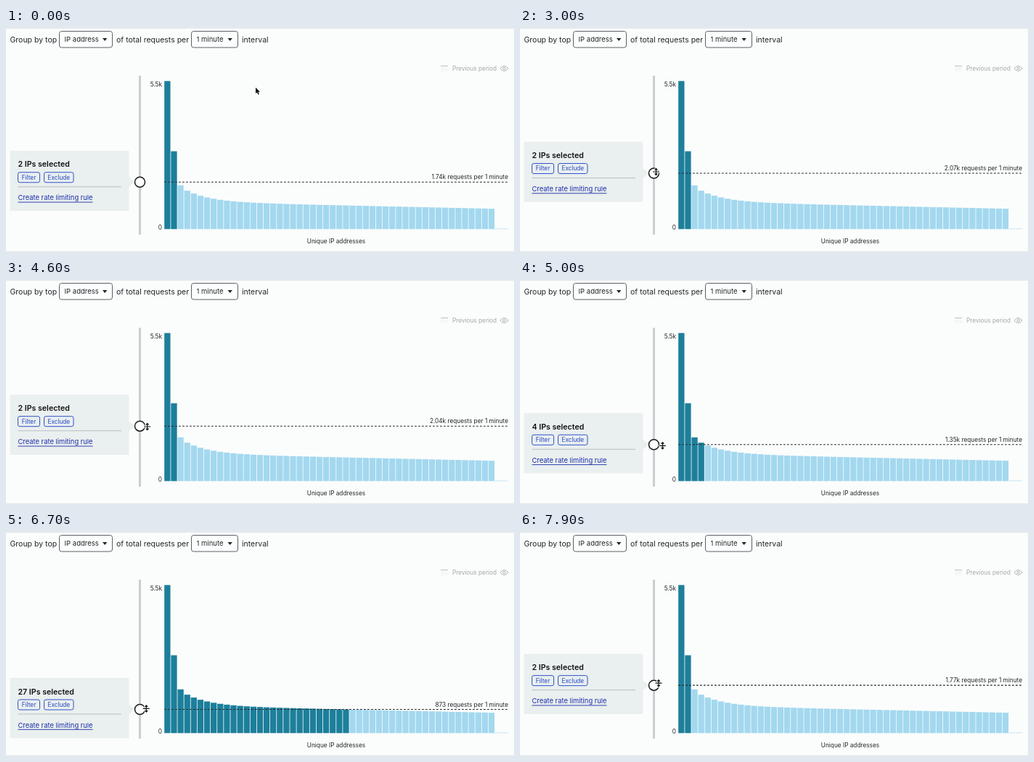
An HTML page for the animation above (8 s loop, 700 px wide and 310 px high).

```html
<!DOCTYPE html>
<html lang="en">
<head>
<meta charset="utf-8">
<title>Rate limit threshold</title>
<style>
html, body { margin: 0; width: 100%; height: 100%; overflow: hidden; background: #fbfdfc; }
svg { display: block; width: 700px; height: 310px; }
text { font: 8.25px Inter, "Liberation Sans", sans-serif; fill: #222528; }
.head { font-size: 10.5px; }
.pick { font-size: 9.5px; }
.title { font-size: 10.6px; font-weight: 600; fill: #111; }
.link { font-size: 9.4px; fill: #1b2fa8; }
.btn { fill: #2447c4; }
.muted { fill: #a3a6a9; }
.end { text-anchor: end; }
.mid { text-anchor: middle; }
.box { fill: #fdfefe; stroke: #596069; }
.button { fill: none; stroke: #2f52c9; }
.cursor { fill: #111; stroke: #fff; stroke-width: 1.6; paint-order: stroke; stroke-linejoin: round; }
</style>
</head>
<body>
<svg viewBox="0 0 700 310">
  <path d="M0 .5H700M0 309.5H700" stroke="#e6e9e9"/>
  <text class="head" x="5.5" y="19.5">Group by top</text>
  <rect class="box" x="73.5" y="4.5" width="73" height="22.5" rx="3"/>
  <text class="pick" x="80.5" y="19.2">IP address</text>
  <path d="M133 14h6.400l-3.200 4z" fill="#222528"/>
  <text class="head" x="152" y="19.5">of total requests per</text>
  <rect class="box" x="255.5" y="4.5" width="64" height="22.5" rx="3"/>
  <text class="pick" x="262.5" y="19.2">1 minute</text>
  <path d="M305.500 14h6.400l-3.200 4z" fill="#222528"/>
  <text class="head" x="325" y="19.5">interval</text>

  <rect x="599" y="52" width="10" height="8" fill="#f5f7f7"/>
  <path d="M599 52.5h10" stroke="#bfc2c4"/>
  <text class="muted" x="615" y="59">Previous period</text>
  <g fill="none" stroke="#a3a6a9" stroke-width=".9">
    <path d="M681 56q5.500-7 11 0q-5.500 7-11 0z"/>
    <circle cx="686.500" cy="56" r="1.600"/>
  </g>

  <text class="end" x="215" y="80.500">5.5k</text>
  <text class="end" x="215" y="278.500">0</text>
  <text class="mid" x="455" y="298">Unique IP addresses</text>
  <g id="bars"></g>
  <rect x="183" y="66" width="3" height="220" fill="#cacdd2"/>

  <!-- everything that follows the threshold, with the line at y = 0 -->
  <g id="level">
    <path d="M5.500-43.500H169.500V-7L176.500 0 169.500 7V39.800H5.500z" fill="#eaefef"/>
    <text class="title" id="count" x="16.500" y="-20.800"></text>
    <rect class="button" x="16.500" y="-13.500" width="30" height="14" rx="2.500"/>
    <text class="btn mid" x="31.500" y="-3.500">Filter</text>
    <rect class="button" x="52.500" y="-13.500" width="40.500" height="14" rx="2.500"/>
    <text class="btn mid" x="72.800" y="-3.500">Exclude</text>
    <path d="M16.500 6.500H159" stroke="#b9bec2"/>
    <text class="link" x="16.500" y="25">Create rate limiting rule</text>
    <path d="M16.500 27.800H119.500" stroke="#1b2fa8" stroke-width=".9"/>
    <path d="M218 0H692" stroke="#24282b" stroke-width="1.100" stroke-dasharray="2.800 2.200"/>
    <text class="end" id="rate" x="692" y="-4"></text>
    <circle cx="184.500" r="7" fill="#fff" stroke="#17191b" stroke-width="1.500"/>
  </g>
  <path class="cursor" id="cursor"/>
</svg>
<script>
const $ = id => document.getElementById(id);
const BASE = 278, SCALE = 37.2, COUNT = 52, PITCH = 474 / COUNT;
const ARROW = 'M0 0V8.500L2 6.700 3.400 10 4.800 9.400 3.500 6.300H6z';
const RESIZE = 'M0-5.500L2.600-2.500H.6V-.6H4.500V.6H.6V2.500H2.600L0 5.500-2.600 2.500H-.6V.6H-4.500V-.6H-.6V-2.500H-2.600z';

// Rows start with a time; the other columns are interpolated.
function sample(rows, t) {
  const i = rows.findLastIndex(row => row[0] <= t);
  const a = rows[i], b = rows[i + 1] || a;
  const f = b === a ? 0 : (t - a[0]) / (b[0] - a[0]);
  return a.slice(1).map((v, k) => v + (b[k + 1] - v) * f);
}

// Thousands of requests: a steep head, a fading shoulder and a long slope.
function requests(i) {
  if (i >= COUNT - 2) return .01;
  return 3.53 * Math.exp(-1.12 * i ** 1.86) + .95 * .76 ** i + 1.02 - .0055 * i;
}
const values = Array.from({ length: COUNT }, (_, i) => requests(i));

// time, threshold
const levels = [[0, 1.74], [2400, 1.74], [3000, 2.07], [3600, 3.2], [4000, 3.07],
  [5000, 1.35], [5800, .8], [6700, .873], [7900, 1.77]];
// time, x, y relative to the line
const pointer = [[0, 344, -131], [800, 215, -25], [1900, 184, 0],
  [3000, 187.5, -2], [5000, 196.5, 1.5], [7900, 191, -3]];
const active = [[200, 800], [1500, 1900], [2600, 5800], [6300, 7900]];

// The picture advances in 200 ms steps while something moves.
function stepTime(t) {
  const [from, to] = active.findLast(span => span[0] <= t) || [0, 0];
  return Math.min(to, from + Math.floor((t - from) / 200) * 200);
}

const bars = values.map((v, i) => {
  const bar = document.createElementNS('http://www.w3.org/2000/svg', 'rect');
  const box = { x: 218.2 + i * PITCH, y: BASE - v * SCALE, width: PITCH - .8, height: v * SCALE + .3 };
  for (const name in box) bar.setAttribute(name, box[name]);
  return $('bars').appendChild(bar);
});

function draw(now) {
  const t = stepTime(now % 8000);
  const [limit] = sample(levels, t), [x, dy] = sample(pointer, t);
  const y = BASE - limit * SCALE;
  const n = values.filter(v => v > limit).length;
  // A bar that just touches the line is coloured too.
  bars.forEach((bar, i) => bar.setAttribute('fill', values[i] > limit - .002 ? '#1d7f9b' : '#a3d8ef'));
  $('level').setAttribute('transform', `translate(0 ${y})`);
  $('count').textContent = `${n} IP${n === 1 ? '' : 's'} selected`;
  const rate = limit < 1 ? Math.round(limit * 1000) : limit.toFixed(2) + 'k';
  $('rate').textContent = `${rate} requests per 1 minute`;
  $('cursor').setAttribute('d', t < 1900 ? ARROW : RESIZE);
  $('cursor').setAttribute('transform', `translate(${x} ${y + dy})`);
}

const start = performance.now();
(function loop() {
  draw(performance.now() - start);
  requestAnimationFrame(loop);
})();
</script>
</body>
</html>
```
